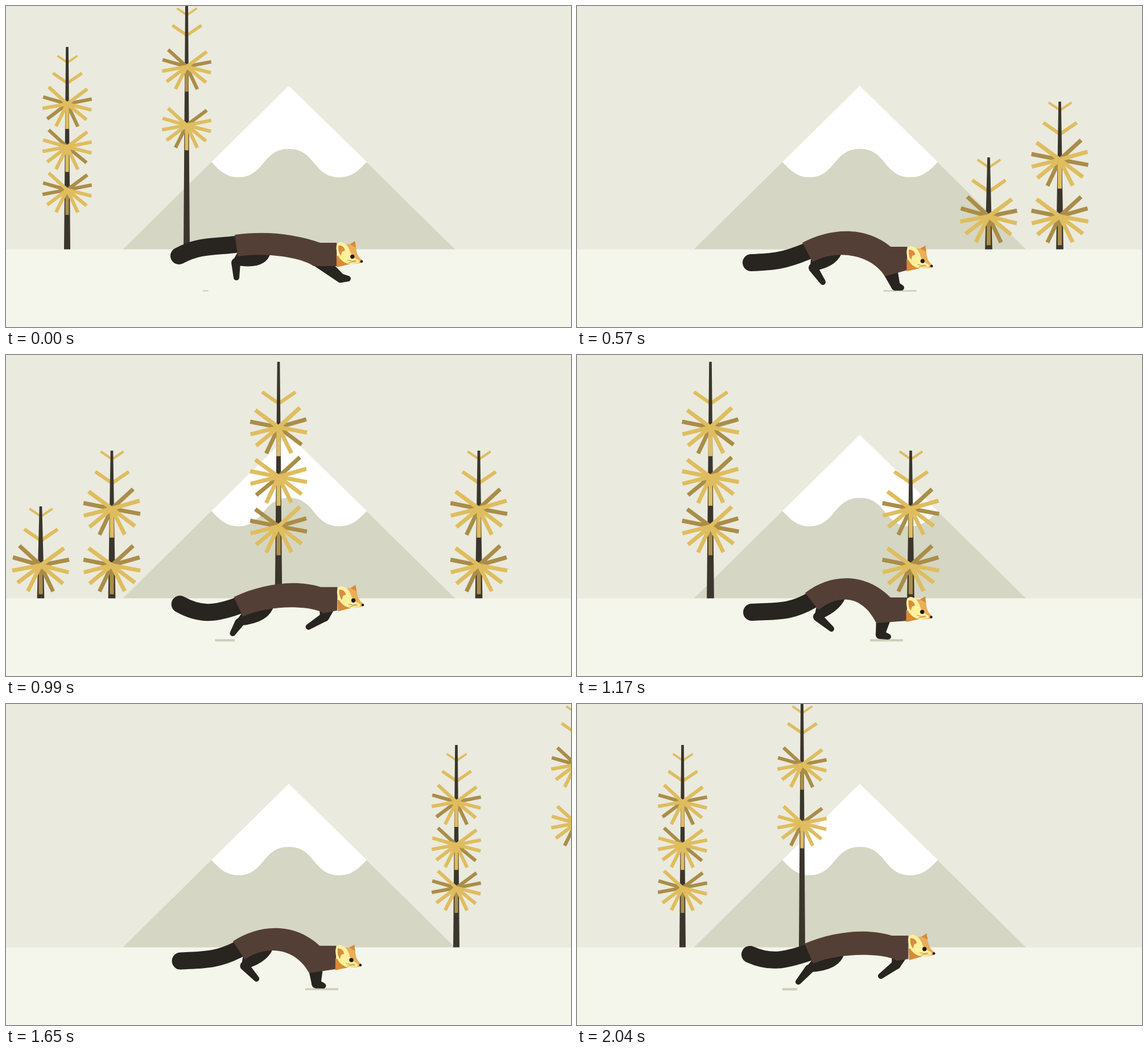
Write an HTML page with a canvas that moves like this. It is 993 px wide and 564 px high and loops after 2070 ms.

```html
<!DOCTYPE html>
<html lang="en">
<head>
<meta charset="utf-8">
<title>Running marten</title>
<style>
html, body { margin: 0; width: 100%; height: 100%; overflow: hidden; background: #eaeade; }
canvas { display: block; }
</style>
</head>
<body>
<canvas id="stage" width="993" height="564"></canvas>
<script>
const ctx = document.getElementById('stage').getContext('2d');
const LOOP = 2070, TICK = 30, STRIDE = LOOP / 4;
const GOLD = '#dfbd5f', BRONZE = '#aa8d48', BARK = '#3b362d';
const FUR = '#543f36', DARK = '#282420', ORANGE = '#e9ae59', RUST = '#d98a35';

// Camera travel at a few moments of the loop
const SCROLL = [
  { at: 570, x: 0 }, { at: 810, x: 418 }, { at: 1170, x: 907 }, { at: 1440, x: 1260 },
  { at: 1860, x: 1924 }, { at: 2040, x: 2198 }, { at: LOOP, x: 2276 }
];

// Which of the eleven branches in a tuft are dark
const SHADES = [[1, 3, 6, 9], [0, 7], [1, 2, 5, 9, 10], [0, 1, 5, 6, 9], [4, 10], [0, 2, 6, 9]];
const BIG = 1.155;
const PINE = { top: 168, size: BIG, flip: -1, vees: [205, 169.5], tuft: 270, gap: 99.5, shades: [5, 3] };
const TREES = [
  { x: 723, top: 266, size: BIG, flip: 1, vees: [306, 270], tuft: 369.5, gap: 0, shades: [3] },
  { ...PINE, x: 848 },
  { x: 1141, top: 12, size: BIG, flip: -1, vees: [65], tuft: 127, gap: 87, shades: [0, 1, 2] },
  { ...PINE, x: 1493 },
  { x: 2383, top: 72, size: 1, flip: 1, vees: [118, 87.5], tuft: 172, gap: 75.5, shades: [0, 1, 2] },
  { x: 2593, top: -30, size: 1, flip: 1, vees: [34, 4], tuft: 106.5, gap: 103, shades: [3, 4] }
];

// Key poses of one stride. rump and tail: point and angle; legs: joint and paw
const reach = { at: 0, head: 414, rump: [402, 402, -8], arch: 16, chest: [541, 457],
  tail: [304, 439, -28], hind: [404, 451, 405, 477], fore: [588, 478, 601, 479] };
const land = { at: 52.5, head: 421, rump: [396, 416, -28], arch: 38, chest: [541, 475],
  tail: [306, 451, -2], hind: [415, 460, 432, 485], fore: [560, 492, 570, 495] };
const stance = { at: 135, head: 424, rump: [401, 418, -38], arch: 46, chest: [526, 471],
  tail: [307, 452, -4], hind: [423, 460, 447, 481], fore: [533, 491, 547, 495] };
const gather = { at: 292.5, head: 423, rump: [409, 437, -47], arch: 32, chest: [545, 466],
  tail: [307, 447, 48], hind: [473, 491, 498, 495], fore: [536, 469, 509, 488] };
const push = { at: 405, head: 409, rump: [402, 444, -34], arch: 16, chest: [541, 466],
  tail: [313, 428, 52], hind: [419, 491, 441, 494], fore: [556, 470, 521, 477] };
const leap = { at: 487.5, head: 405, rump: [400, 421, -23], arch: 14, chest: [562, 451],
  tail: [304, 440, 24], hind: [408, 466, 389, 488], fore: [561, 458, 534, 478] };
const GAIT = [reach, land, stance, gather, { ...gather, at: 307.5 }, push, leap, { ...reach, at: STRIDE }];

const clamp = (v, lo, hi) => Math.max(lo, Math.min(hi, v));

function mix(a, b, k) {
  if (typeof a === 'number') return a + (b - a) * k;
  const out = Array.isArray(a) ? [] : {};
  for (const key in a) out[key] = mix(a[key], b[key], k);
  return out;
}

function sample(keys, t) {
  const i = clamp(keys.findIndex(key => key.at > t), 1, keys.length - 1);
  const a = keys[i - 1], b = keys[i];
  return mix(a, b, (t - a.at) / (b.at - a.at));
}

function polar([x, y], deg, len) {
  const a = deg * Math.PI / 180;
  return [x + Math.cos(a) * len, y + Math.sin(a) * len];
}

function fill(color, path) {
  ctx.fillStyle = color;
  ctx.fill(typeof path === 'string' ? new Path2D(path) : path);
}

function line(color, width, ...pts) {
  ctx.strokeStyle = color;
  ctx.lineWidth = width;
  ctx.beginPath();
  pts.forEach(([x, y]) => ctx.lineTo(x, y));
  ctx.stroke();
}

function dot(color, x, y, r) {
  ctx.fillStyle = color;
  ctx.beginPath();
  ctx.arc(x, y, r, 0, Math.PI * 2);
  ctx.fill();
}

function landscape() {
  ctx.fillStyle = '#eaeade';
  ctx.fillRect(0, 0, 993, 564);
  fill('#d5d6c3', 'M497 140L789.5 428H205Z');
  fill('#fff', 'M497 140L361 274C377 292 390 301 408 301C455 301 450 251 497 251' +
    'C544 251 539 301 586 301C605 301 618 292 634 274Z');
  ctx.fillStyle = '#f4f6eb';
  ctx.fillRect(0, 427.5, 993, 137);
}

// Branches fan out evenly on both sides of the one hanging straight down
function tuft(y, dark, size, flip) {
  const branch = i => {
    const step = i < 5 ? 26.5 : 25.3;
    const tip = polar([0, y], 90 - (i - 5) * step * flip, 44 * size);
    line(dark.includes(i) ? BRONZE : GOLD, 6.2 * size, [0, y], tip);
  };
  dark.forEach(branch);
  for (let i = 0; i < 11; i++) if (!dark.includes(i)) branch(i);
}

function tree({ x, top, size, flip, vees, tuft: first, gap, shades }, scroll) {
  const cx = x - scroll;
  if (cx < -60 || cx > 1060) return;
  ctx.save();
  ctx.translate(cx + 0.5, 0);
  vees.forEach((y, i) => {
    const half = (25 - 8 * i) * size;
    line(GOLD, half * 0.22, [-half, y], [0.5, y + half * 0.7], [half + 1, y]);
  });
  const a = 2.3, b = 5.5 * size;
  fill(BARK, `M${-a} ${top}H${a}L${b} 427.5H${-b}Z`);
  shades.forEach((s, i) => tuft(first + gap * i, SHADES[s], size, flip));
  ctx.restore();
}

// The mark under the planted feet drifts back, then shrinks in flight
function shadow(p) {
  const q = p < 17 ? p + STRIDE : p;
  const x = 582 - 0.27 * q - 6.6e-7 * q ** 3;
  const w = 58 * clamp((535 - q) / 105, 0, 1);
  const h = Math.min(4, 1.5 + 0.02 * q, (550 - q) / 15);
  ctx.fillStyle = '#cfceb9';
  ctx.fillRect(x - w / 2, 499.3, w, h);
}

// Tapered segment with round ends
function bone(x1, y1, r1, x2, y2, r2) {
  const dir = Math.atan2(y2 - y1, x2 - x1);
  const d = Math.hypot(x2 - x1, y2 - y1) || 1;
  const side = Math.acos(clamp((r1 - r2) / d, -1, 1));
  const path = new Path2D();
  path.arc(x1, y1, r1, dir + side, dir - side + Math.PI * 2);
  path.arc(x2, y2, r2, dir - side, dir + side);
  fill(DARK, path);
}

function head(x, y) {
  ctx.save();
  ctx.translate(x, y);
  ctx.rotate((y - 420) * 0.0035);
  fill(RUST, 'M1 24L1 45L24 40L30 34Z');
  fill(ORANGE, 'M15 5L25 5L34 0L36 14C37 23 40 29 46 33L46 37L42 39L28 40L20 24Z');
  fill(RUST, 'M25 5L34 0L35.5 11Z');
  fill('#fff09c', 'M1 12C1 2 7 -1 13 2C20 5 24 12 26 20C29 27 36 31 41 34L40 38L26 40C13 39 2 29 1 12Z');
  fill('#d98c44', 'M5 7C11 6 16 11 16 16L11 18L9 25C5 20 4 13 5 7Z');
  line('#b98a4c', 1, [20, 33], [28, 35], [35, 34]);
  line('#b98a4c', 1, [22, 38], [29, 36], [36, 36]);
  dot('#1f1a17', 29, 27, 3.7);
  dot('#1f1a17', 45, 35.8, 2.3);
  ctx.restore();
}

function marten({ head: hy, rump, arch, chest, tail, hind, fore }) {
  const [rx, ry, lean] = rump, [kx, ky] = chest;
  const hx = 578 + (424 - hy) / 8;
  const top = [rx, ry], low = polar(top, lean + 90, 38);
  const neck = [hx - 27, hy + 2];

  // Tail
  const root = polar(top, lean + 90, 17);
  ctx.strokeStyle = DARK;
  ctx.lineWidth = 30;
  ctx.lineCap = 'round';
  ctx.beginPath();
  ctx.moveTo(tail[0], tail[1]);
  ctx.bezierCurveTo(...polar(tail, tail[2], 40), ...polar(root, lean * 0.8 + 180, 44), ...root);
  ctx.stroke();
  ctx.lineCap = 'butt';

  // Hind leg
  const hip = polar(low, lean * 0.8, 58);
  const thigh = new Path2D();
  thigh.moveTo(...polar(low, lean - 90, 6));
  thigh.lineTo(...hip);
  thigh.quadraticCurveTo(hip[0] - 7, hip[1] + 30, hind[0] + 3, hind[1] + 5);
  thigh.lineTo(hind[0] - 5, hind[1] - 4);
  fill(DARK, thigh);
  bone(hind[0], hind[1], 8, hind[2], hind[3], 5);

  // Fore leg
  bone(kx + (hx - kx) / 4, ky - 10, 13, fore[0], fore[1], 8);
  bone(fore[0], fore[1], 8, fore[2], fore[3], 5);

  // Body
  const body = new Path2D();
  body.moveTo(...top);
  body.bezierCurveTo(...polar(top, lean, 54), neck[0] - 46, neck[1] - arch, ...neck);
  body.lineTo(hx + 2, hy + 2);
  body.lineTo(hx + 2, hy + 43);
  body.lineTo(kx, ky);
  body.bezierCurveTo(kx - 23, ky - arch, ...polar(low, lean, 50), ...low);
  fill(FUR, body);

  head(hx, hy);
}

function draw(t) {
  // The last trees leave during the first part of the loop, then the row starts over
  const scroll = t < 510 ? 2276 + 1.45 * t : (t < 570 ? (t - 570) * 1.52 : sample(SCROLL, t).x);
  const p = t % STRIDE;
  landscape();
  TREES.forEach(item => tree(item, scroll));
  shadow(p);
  marten(sample(GAIT, p));
}

const start = performance.now();
function frame() {
  const t = (performance.now() - start + 0.5) % LOOP;
  draw(Math.floor(t / TICK) * TICK);
  requestAnimationFrame(frame);
}
frame();
</script>
</body>
</html>
```
